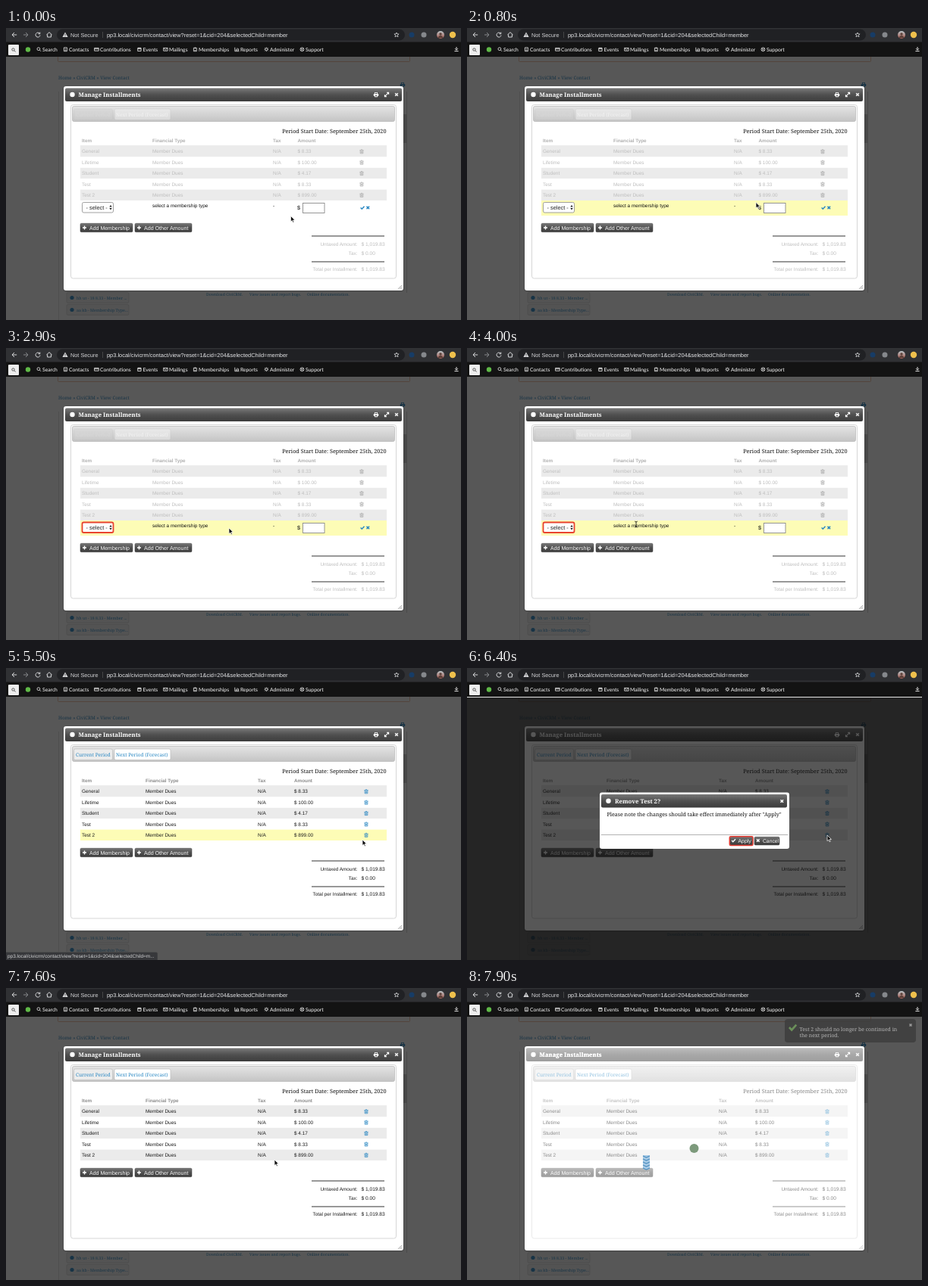
Animation, 600 px wide and 386 px high, one loop 8 s. Source, as an HTML page:

```html
<!DOCTYPE html>
<html lang="en">
<head>
<meta charset="utf-8">
<title>Manage Installments</title>
<style>
  html, body { margin: 0; width: 100%; height: 100%; overflow: hidden; background: #1d1d1d; }
  svg { display: block; width: 600px; height: 386px; text-rendering: geometricPrecision; white-space: pre;
        font-family: "Liberation Sans", Arial, sans-serif; font-size: 6.45px; }
</style>
</head>
<body>
<svg viewBox="0 0 600 386">
  <defs>
    <linearGradient id="bar" x2="0" y2="1"><stop stop-color="#777"/><stop offset=".5" stop-color="#505050"/><stop offset="1" stop-color="#3c3c3c"/></linearGradient>
    <linearGradient id="strip" x2="0" y2="1"><stop stop-color="#e4e4e4"/><stop offset="1" stop-color="#c4c4c4"/></linearGradient>
    <linearGradient id="photo" x2="0" y2="1"><stop stop-color="#b9c4c8"/><stop offset="1" stop-color="#a8574c"/></linearGradient>
  </defs>
  <g id="stage"></g>
</svg>
<script>
const LOOP = 8000, STEP = 100;
const LINK = '#2786c2', MUTED = '#bebebe', YELLOW = '#fdfcb6';
const URL_TEXT = 'pp3.local/civicrm/contact/view?reset=1&cid=204&selectedChild=';
const SERIF = 'font-family="Noto Serif, Georgia, serif"';
const LATO = 'font-family="Lato, sans-serif"';
const BOLD = 'font-weight="bold"';
const END = 'text-anchor="end"';

// Markup helpers
const esc = s => s.replace(/&/g, '&amp;').replace(/</g, '&lt;');
const text = (x, y, s, fill = '#111', size = 6.45, more = '') =>
  `<text x="${x}" y="${y}" fill="${fill}" font-size="${size}" ${more}>${esc(s)}</text>`;
const serif = (x, y, s, fill, size, more = '') => text(x, y, s, fill, size, SERIF + ' ' + more);
const box = (x, y, x2, y2, fill, r = 0, more = '') =>
  `<rect x="${x}" y="${y}" width="${x2 - x}" height="${y2 - y}" rx="${r}" fill="${fill}" ${more}/>`;
const dot = (x, y, r, fill, more = '') => `<circle cx="${x}" cy="${y}" r="${r}" fill="${fill}" ${more}/>`;
const line = (x, y, d, stroke, width = 1, scale = 1) =>
  `<path transform="translate(${x} ${y}) scale(${scale})" d="${d}" fill="none" stroke="${stroke}" stroke-width="${width}"/>`;
const shape = (x, y, d, fill, more = '') =>
  `<path transform="translate(${x} ${y})" d="${d}" fill="${fill}" ${more}/>`;

const cross = (x, y, c, r = 1.8) => line(x, y, `M${-r} ${-r}L${r} ${r}M${r} ${-r}L${-r} ${r}`, c, 1.5);
const check = (x, y, c, scale = 1) => line(x, y, 'M-2.4 0L-.7 1.8L2.5-1.8', c, 1.4, scale);
const plus = (x, y) => line(x, y, 'M-2.5 0h5M0-2.5v5', '#fff', 1.4);
const trash = (x, y, c) => line(x, y, 'M-2.6-1.7h5.2M-.9-2.5h1.8M-1.8-1.5v4h3.6v-4M-.6-.6v2.2M.6-.6v2.2', c, .75);
const printer = (x, y, c) => shape(x, y, 'M-2-3h4v2h1.2v3h-1.2v1.2h-4v-1.2h-1.2v-3h1.2zM-1.2-2.2v1.4h2.4v-1.4zM-1.2 1v1.2h2.4v-1.2z', c, 'fill-rule="evenodd"');
const button = (x, y, x2, y2) => box(x, y, x2, y2, 'url(#bar)', 1.5, 'stroke="#3a3a3a" stroke-width=".5"');

function browser() {
  const c = '#d6d7d9';
  return box(0, 0, 600, 19, '#303134') + box(67, 1.5, 526, 16.5, '#202124', 7.5) +
    line(11, 9, 'M3.2 0h-6M0-3l-3 3l3 3', c) + line(26, 9, 'M-3 0h6M0-3l3 3l-3 3', '#85878a') +
    line(42, 9, 'M2.2-2A3 3 0 1 0 3 .6M2.8-3.4v2.2h-2.2', c) +
    line(57, 9, 'M-3.6 0L0-3.3L3.6 0M-2.4-.6v3.6h4.8v-3.6', c) +
    shape(78, 9, 'M0-3.4L3.6 3h-7.2zM-.4-1.2v2h.8v-2zM-.4 1.4v.8h.8v-.8z', c, 'fill-rule="evenodd"') +
    text(85, 11.6, 'Not Secure', c, 7.3) + line(127.5, 9, 'M0-4v8', '#555', .7) +
    text(133, 11.6, URL_TEXT + 'member', '#e4e5e7', 7.42) +
    line(515, 9, 'M0-3l.9 2h2.2l-1.7 1.5l.6 2.2l-2-1.2l-2 1.2l.6-2.2l-1.7-1.5h2.2z', c, .8) +
    dot(535, 9, 3.5, '#173c66') + dot(551, 9, 3.5, '#85888c') +
    dot(573, 9, 5, 'url(#photo)') + dot(573, 8, 1.7, '#5b4038') + shape(573, 9, 'M-3 3.9a3 3 0 0 1 6 0z', '#5b4038') +
    dot(589, 9, 4.2, '#eec04c');
}

const MENU = [[48, 'Search'], [83, 'Contacts'], [124, 'Contributions'], [180.5, 'Events'], [215, 'Mailings'],
  [254, 'Memberships'], [309, 'Reports'], [348, 'Administer'], [395, 'Support']];
const MENU_ICONS = [
  'M1.1.9L2.8 2.6M1.4-.6a1.9 1.9 0 1 1-3.8 0a1.9 1.9 0 1 1 3.8 0z',
  'M-2-2.4h4v4.8h-4zM-.9 1.4h1.8M0-1.2v1.4',
  'M-2.8-1.9h5.6v3.8h-5.6zM-2.8-.6h5.6',
  'M-2.2-1.8h4.4v4h-4.4zM-2.2-.6h4.4M-1-2.6v1.4M1-2.6v1.4',
  'M-2.7-1.9h5.4v3.8h-5.4zL0 .6L2.7-1.9',
  'M-2-2h4v4.4h-4zM-.8 1.2h1.6M0-2.8v2.2',
  'M-2.6-2.6v5h5.6M-1 1.8v-2M.6 1.8v-3.6M2.2 1.8v-2.8',
  'M1.6 0a1.6 1.6 0 1 1-3.2 0a1.6 1.6 0 1 1 3.2 0zM0-2.8v1M0 1.8v1M-2.8 0h1M1.8 0h1M-2-2l.8.8M2 2l-.8-.8M2-2l-.8.8M-2 2l.8-.8',
  'M2.4 0a2.4 2.4 0 1 1-4.8 0a2.4 2.4 0 1 1 4.8 0zM-1.7-1.7L1.7 1.7M1.7-1.7L-1.7 1.7'];

function menu() {
  return box(0, 18.5, 600, 38, '#131313') + box(3, 22, 17, 36, '#eee', 1) +
    line(10, 29, 'M1 .9L2.6 2.5M1.2-.5a1.7 1.7 0 1 1-3.4 0a1.7 1.7 0 1 1 3.4 0z', '#444', .9) +
    dot(29, 28.5, 3.2, '#5fb947') +
    MENU.map(([x, s], i) => line(x - 4.6, 28.3, MENU_ICONS[i], '#eee', .8) + text(x, 30.7, s, '#fff', 6.75, LATO)).join('') +
    line(594, 28, 'M0-3v4M-2-.8L0 1.2L2-.8M-2.6 2.6h5.2', '#ddd');
}

const dim = () => box(0, 38, 600, 386, '#111', 0, 'opacity=".7"');

function page() {
  const tile = (y, s) => box(80, y, 162, y + 14, '#f4f4f4', 2, 'stroke="#ccc" stroke-width=".6"') +
    dot(87, y + 7, 2.6, LINK) + serif(93, y + 9, s, LINK, 5.3);
  return box(0, 38, 600, 386, '#fff') +
    box(68.5, 36, 532.5, 44.5, '#fff', 1, 'stroke="#eeb08c" stroke-width=".8"') +
    serif(69, 68, 'Home » CiviCRM » View Contact', LINK, 6.17) + printer(523, 75, LINK) +
    line(528.5, 84, 'M0 0v266', '#d5d5d5') + line(69.5, 84, 'M0 0v302', '#e2e2e2') + box(524, 114, 529, 152, '#cfcfcf') +
    tile(349.5, 'hh ut - 18 8.33 - Member ...') + tile(365.5, 'aa kb - Membership Type...') +
    serif(264, 354, 'Download CiviCRM.', LINK, 5.1) + serif(321, 354, 'View issues and report bugs.', LINK, 5) +
    serif(397, 354, 'Online documentation.', LINK, 5.1) + dim();
}

const ROWS = [['General', '8.33'], ['Lifetime', '100.00'], ['Student', '4.17'], ['Test', '8.33'], ['Test 2', '899.00']];

function table(editing, hover) {
  const cols = editing ? [100, 193, 352, 384.5, 469] : [100, 184, 332, 380, 475];
  const ink = editing ? MUTED : '#1a1a1a';
  const head = ['Item', 'Financial Type', 'Tax', 'Amount']
    .map((s, i) => text(cols[i], 151, s, editing ? '#b0b0b0' : '#8c8c8c', 6.35, BOLD)).join('');
  return head + line(98, 155.6, 'M0 0h404', '#ddd', .6) + ROWS.map(([name, sum], i) => {
    const y = 156 + 14.4 * i;
    const fill = i === 4 && hover ? YELLOW : i % 2 ? '#fff' : '#ebebeb';
    return box(98, y, 502, y + 14.4, fill) +
      [name, 'Member Dues', 'N/A', '$ ' + sum].map((s, j) => text(cols[j], y + 9.3, s, ink)).join('') +
      trash(cols[4], y + 7.3, editing ? '#aaa' : LINK);
  }).join('');
}

function editRow(hover, invalid) {
  const frame = invalid ? 'stroke="#e8432e" stroke-width="1.8"' : 'stroke="#8a8a8a" stroke-width=".8"';
  return box(98, 228, 502, 248, hover ? YELLOW : '#fff') +
    box(100.5, 230.5, 141.5, 244, '#fff', 2, frame) + text(105.5, 239.8, '- select -', '#222', 7.4) +
    shape(138, 237.3, 'M-1.7-.8L0-3.2L1.7-.8zM-1.7.8L0 3.2L1.7.8z', '#222') +
    text(193, 237.3, 'select a membership type') + text(352, 237.3, '-') + text(384, 240, '$', '#111', 7.2) +
    box(391.5, 231.5, 420, 244.5, '#fff', 0, 'stroke="#8a8a8a" stroke-width=".9"') +
    check(470, 237.5, LINK) + cross(477.3, 237.5, LINK);
}

function totals(dy, ink) {
  const row = (y, label, sum) => text(463.5, y, label, ink, 6.4, END) + text(468.5, y, sum, ink, 6.6);
  return `<g transform="translate(0 ${dy})">` +
    button(98, 238.3, 167, 249.7) + plus(103.5, 244) + text(110, 246.5, 'Add Membership', '#fff', 7) +
    button(170, 238.3, 245, 249.7) + plus(175.5, 244) + text(182, 246.5, 'Add Other Amount', '#fff', 7.1) +
    line(403, 255, 'M0 0h96M0 34h96', '#777', 1.6) +
    row(267.8, 'Untaxed Amount:', '$ 1,019.83') + row(279.5, 'Tax:', '$ 0.00') +
    row(301.3, 'Total per Installment:', '$ 1,019.83') + '</g>';
}

function tabs(editing) {
  const edge = `stroke="#bbb" stroke-width=".6" opacity="${editing ? .35 : 1}"`;
  const ink = editing ? '#f4f4f4' : LINK;
  return box(87.5, 103.5, 512.5, 123.5, 'url(#strip)', 2, 'stroke="#b4b4b4" stroke-width=".7"') +
    box(89.5, 107, 140.5, 121.5, editing ? '#d2d2d2' : '#ececec', 2, edge) + box(143, 107, 217, 121.5, '#fff', 2, edge) +
    serif(92, 116.8, 'Current Period', editing ? '#d8d8d8' : ink, 6.45) +
    serif(145, 116.8, 'Next Period (Forecast)', ink, 6.5);
}

function installments(s) {
  return box(75, 77, 525, 348.5, '#000', 4, 'opacity=".15"') + box(76, 77, 524, 347, '#fff', 3) +
    box(78, 79.5, 522, 97, 'url(#bar)', 2) + dot(87.5, 88, 3.2, '#fff') +
    serif(95.5, 90.8, 'Manage Installments', '#fff', 7.75, BOLD) + printer(488, 88, '#fff') +
    line(502, 88, 'M-2.6 2.6L2.6-2.6M.2-2.6h2.4v2.4M-2.6.2v2.4h2.4', '#fff', 1.1) + cross(515, 88, '#fff') +
    box(85.5, 101.5, 514.5, 331, '#fff', 3, 'stroke="#ccc" stroke-width=".8"') + tabs(s.editing) +
    serif(501.5, 138.5, 'Period Start Date: September 25th, 2020', '#111', 7.27, END) +
    table(s.editing, s.hoverLast) + (s.editing ? editRow(s.hoverEdit, s.invalid) : '') +
    totals(s.editing ? 20 : 0, s.editing ? MUTED : '#1a1a1a') +
    line(522, 345, 'M-5 0L0-5M-3 0L0-3M-1 0L0-1', '#888', .7);
}

function confirmBox(focused) {
  return dim() + box(0, 38, 600, 39, '#e4e4e4') +
    box(175, 164.5, 425, 239, '#fff', 3) + box(177, 167, 422, 184.5, 'url(#bar)', 2) +
    dot(186.5, 175.8, 3.2, '#fff') + serif(195, 178.6, 'Remove Test 2?', '#fff', 7.75, BOLD) + cross(415.3, 176, '#fff') +
    serif(184.5, 196.4, 'Please note the changes should take effect immediately after "Apply"', '#111', 7.09) +
    line(177, 220.5, 'M0 0h246', '#aaa', .9) +
    button(347, 223.3, 376.5, 234) + check(351.5, 228, '#fff') + text(357.5, 231, 'Apply', '#fff', 6.9) +
    (focused ? box(346.3, 222.8, 377, 234.5, 'none', 1.5, 'stroke="#e2382f" stroke-width="1.5"') : '') +
    button(379, 223.3, 412, 234) + cross(383.8, 228, '#fff') + text(390, 231, 'Cancel', '#fff', 6.75);
}

function notice() {
  return box(419, 41, 592, 72, '#3e3e3e', 4, 'opacity=".85"') + check(429.5, 52, '#6b8f5a', 1.9) +
    serif(438.5, 57, 'Test 2 should no longer be continued in', '#b4b4b4', 6.88) +
    serif(438.5, 65.2, 'the next period.', '#b4b4b4', 6.88) + cross(585, 49, '#999', 1.5);
}

const statusBar = () => box(-2, 375.5, 200, 388, '#37383b', 2, 'stroke="#555" stroke-width=".6"') +
  text(2, 382.6, URL_TEXT + 'm...', '#d2d3d5', 6.42);

// Pointer path: time, x, y
const PATH = [[0, 375.5, 248.5], [300, 375.5, 248.5], [400, 378, 237], [700, 378, 237], [900, 384, 224], [1000, 391, 224],
  [1200, 401, 239], [1800, 401, 239], [2300, 470, 237], [2600, 470, 237], [3200, 118, 239], [3600, 118, 239],
  [4000, 223, 233], [4500, 477, 237], [4900, 477, 237], [5500, 470, 227], [5800, 475, 221], [6900, 475, 221],
  [7400, 354, 227], [7600, 354, 227], [7900, 236, 230]];

function pointerAt(t) {
  const i = PATH.findIndex(k => k[0] > t);
  if (i < 0) return PATH[PATH.length - 1].slice(1);
  const [t0, x0, y0] = PATH[i - 1], [t1, x1, y1] = PATH[i];
  const u = (t - t0) / (t1 - t0), e = u * u * (3 - 2 * u);
  return [x0 + (x1 - x0) * e, y0 + (y1 - y0) * e];
}

function pointer(t, x, y, editing) {
  if (t >= 7900) return box(232, 221, 241, 239.5, '#a9cbe6') +
    [0, 1, 2, 3, 4].map(i => line(232, 222 + i * 4, 'M0 0l4.5 2l4.5-2', '#4e8fc0', 1.2)).join('');
  const within = (x0, x1, y0, y1) => x > x0 && x < x1 && y > y0 && y < y1;
  if (editing && (within(391, 420, 231, 245) || within(193, 268, 230, 241)))
    return line(x, y, 'M-1.8-3.8Q0-3.8 0-2.6Q0-3.8 1.8-3.8M0-2.8v5.8M-1.8 4Q0 4 0 2.8Q0 4 1.8 4', '#222', .9);
  return shape(x, y, 'M0 0v7.6l1.8-1.6l1.2 2.8l1.3-.6l-1.2-2.7h2.4z', '#111', 'stroke="#fff" stroke-width=".7"');
}

const between = (t, a, b) => t >= a && t < b;

function scene(t) {
  const [x, y] = pointerAt(t);
  const editing = t < 4900, asking = between(t, 6200, 7600);
  const state = {
    editing,
    invalid: t >= 2400,
    hoverEdit: y >= 228 && y < 248,
    hoverLast: y >= 213.6 && y < 228 && !asking && t < 7600,
  };
  const veil = t >= 7900 ? .5 : t >= 7700 ? (t - 7600) / 600 : 0;
  const clicking = between(t, 2300, 2500) || between(t, 4600, 4800) || between(t, 5900, 6100) || between(t, 7400, 7600);
  return page() + installments(state) +
    (veil ? box(78, 79.5, 522, 346, '#fff', 2, `opacity="${veil}"`) + serif(95.5, 90.8, 'Manage Installments', '#fff', 7.75, BOLD) : '') +
    (t >= 7900 ? notice() + dot(299.5, 212, 6, '#7d9a7c') : '') +
    browser() + menu() + (asking ? confirmBox(t < 7300) : '') +
    (between(t, 4600, 6200) ? statusBar() : '') +
    pointer(t, x, y, editing) +
    (clicking ? dot(x + .5, y, 10, 'none', 'stroke="#222" stroke-width="1.1"') : '');
}

const stage = document.getElementById('stage');
let shown = -1;
function tick(now) {
  const t = Math.floor(now % LOOP / STEP) * STEP;
  if (t !== shown) stage.innerHTML = scene(shown = t);
  requestAnimationFrame(tick);
}
tick(performance.now());
</script>
</body>
</html>
```
